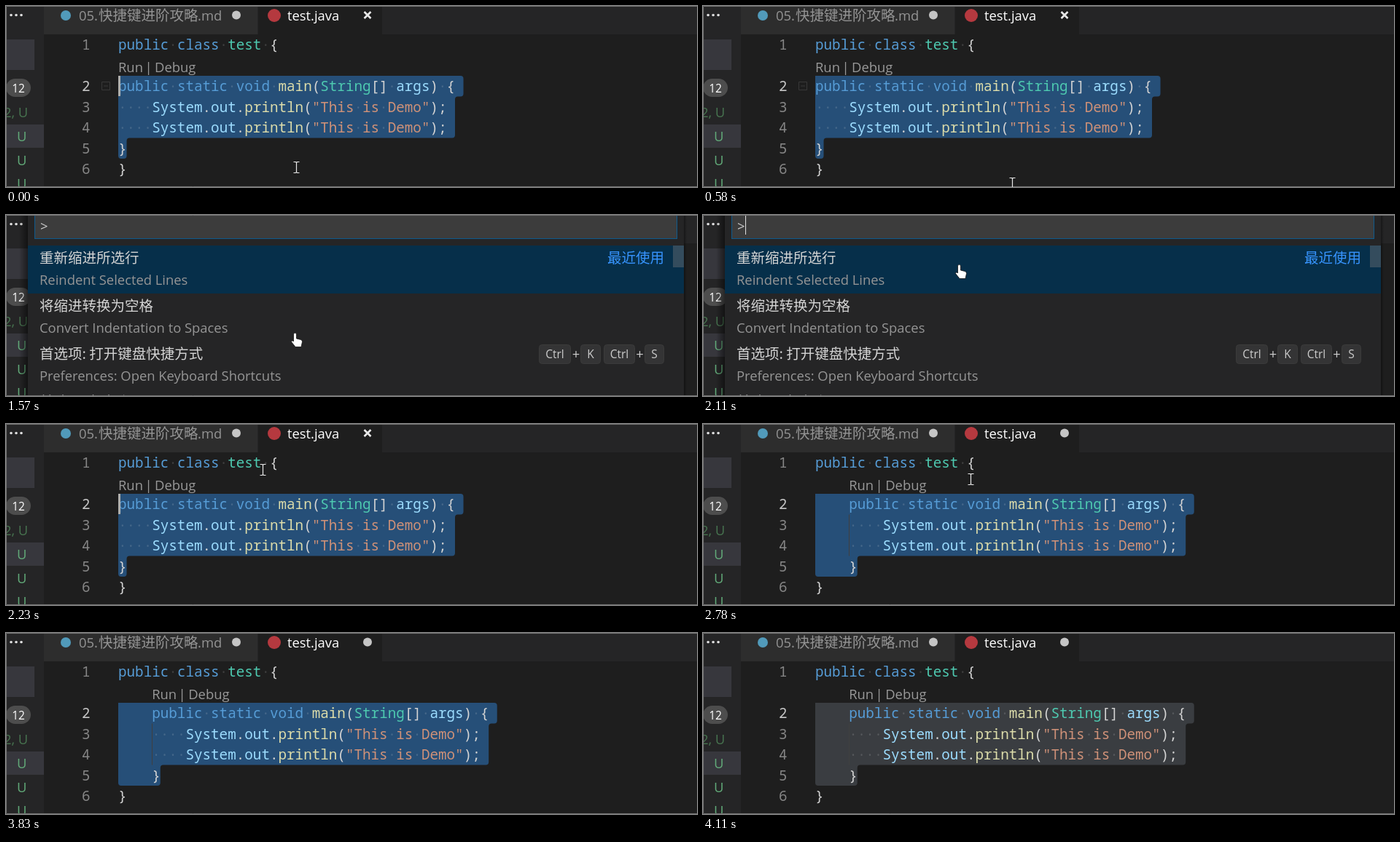
An HTML page that plays this animation: 948x249 px, repeating every 4210 ms.

```html
<!DOCTYPE html>
<html lang="zh">
<head>
<meta charset="utf-8">
<title>Reindent selected lines</title>
<style>
  html, body { margin: 0; width: 100%; height: 100%; overflow: hidden; background: #1e1e1e; }
  svg { display: block; width: 948px; height: 249px; }
  .ui { font: 18.4px "Open Sans", sans-serif; }
  .key { font: 15.5px "Open Sans", sans-serif; }
  .cjk { font: 19.5px "Noto Sans CJK SC", "Noto Sans CJK", sans-serif; }
  .code { font: 19.25px "Noto Sans Mono", monospace; }
</style>
</head>
<body>
<svg id="stage" viewBox="0 0 948 249"></svg>
<script>
const LOOP = 4210, LEFT = 154, CHAR = 11.55, ROW = 28.5;

const rect = (x, y, w, h, fill, more = '') =>
  `<rect x="${x}" y="${y}" width="${w}" height="${h}" fill="${fill}" ${more}/>`;
const text = (cls, x, y, fill, str, more = '') =>
  `<text class="${cls}" x="${x}" y="${y}" fill="${fill}" ${more}>${str}</text>`;
const dot = (x, y, r, fill, more = '') =>
  `<circle cx="${x}" cy="${y}" r="${r}" fill="${fill}" ${more}/>`;
const middle = 'text-anchor="middle"';

// Syntax colouring, with visible whitespace
const words = {};
const paint = (color, list) => list.split(' ').forEach(w => words[w] = color);
paint('#569cd6', 'public class static void');
paint('#4ec9b0', 'test String');
paint('#dcdcaa', 'main println');
paint('#9cdcfe', 'System out args');

const span = (str, color) => str.replace(/ +|[^ ]+/g, s => s[0] === ' '
  ? `<tspan fill="#e3e4e2" fill-opacity=".17">${'·'.repeat(s.length)}</tspan>`
  : `<tspan fill="${color}">${s}</tspan>`);
const highlight = line => line.replace(/"[^"]*"|\w+| +|[^\w" ]+/g, s =>
  span(s, s[0] === '"' ? '#ce9178' : words[s] || '#d4d4d4'));
const baseline = n => n === 1 ? 60 : 117 + (n - 2) * ROW;
const code = (n, line) => text('code', LEFT, baseline(n), '#d4d4d4', highlight(line));

const print = '    System.out.println("This is Demo");';

function selection(indent) {
  const end = n => LEFT + (n + indent) * CHAR;
  const a = end(41), b = end(40), c = end(1);
  return `M154 96H${a - 4}q4 0 4 4V120.5q0 4-4 4H${b + 4}q-4 0-4 4V177.5q0 4-4 4` +
    `H${c + 4}q-4 0-4 4V206q0 4-4 4H158q-4 0-4-4Z`;
}

const sidebar =
  rect(0, 0, 52, 249, '#252526') +
  rect(0, 46, 39, 42, '#37373d') +
  rect(0, 163, 52, 32, '#37373d') +
  [7, 14, 21].map(x => dot(x, 12.5, 1.8, '#e0e0e0')).join('') +
  rect(0, 100, 34, 25, '#4d4d4d', 'rx="12.5"') +
  text('key', 17, 118.5, '#fff', '12', middle) +
  text('ui', -3, 153, '#47734f', '2, U') +
  [186, 219, 251].map(y => text('ui', 15, y, '#62ab79', 'U')).join('');

const tabs =
  rect(52, 0, 896, 39, '#252526') +
  rect(52, 0, 293, 39, '#2d2d2d') +
  rect(346, 0, 170, 39, '#1e1e1e') +
  dot(82, 13, 7, '#519aba') +
  text('ui', 100, 20, '#949494', '05.') +
  text('cjk', 127, 20, '#949494', '快捷键进阶攻略') +
  text('ui', 263, 20, '#949494', '.md') +
  dot(316, 12.5, 6, '#c5c5c5') +
  dot(368, 13, 9, '#b5393f') +
  text('ui', 386, 20, '#fff', 'test.java') +
  '<path id="close" d="M491.5 8l9 9m0-9l-9 9" stroke="#e8e8e8" stroke-width="2.6"/>' +
  dot(496, 12.5, 6, '#c5c5c5', 'id="dirty"');

const editor =
  [1, 2, 3, 4, 5, 6].map(n => text('code', 115.5, baseline(n),
    n === 2 ? '#c6c6c6' : '#858585', n, 'text-anchor="end"')).join('') +
  '<path id="fold" d="M131.500 104.500h11v11h-11zM134 110h6" fill="none" stroke="#383838"/>' +
  '<path id="selection"/>' +
  rect(200, 124.5, 1, 57, '#404040', 'id="guide"') +
  code(1, 'public class test {') +
  '<g id="block">' +
    text('ui', 154, 91, '#999', 'Run') +
    text('ui', 195.5, 91, '#999', '|', middle) +
    text('ui', 204, 91, '#999', 'Debug') +
    code(2, 'public static void main(String[] args) {') +
    code(3, print) + code(4, print) + code(5, '}') +
  '</g>' +
  code(6, '}') +
  rect(154, 96, 3, 28, '#aeafad', 'id="caret"');

const item = (row, title, detail) =>
  text('cjk', 46, 66 + row * 66, '#d4d4d4', title) +
  text('ui', 46, 95.5 + row * 66, '#959595', detail);
const key = (x, w, label) =>
  rect(x + .5, 178.5, w - 1, 26, '#343435', 'rx="4" stroke="#3b3b3b"') +
  text('key', x + w / 2, 197, '#ccc', label, middle);
const plus = x => text('ui', x, 198, '#ccc', '+', middle);

const palette =
  '<g id="palette">' +
    rect(18, 0, 12, 249, 'url(#shadeLeft)') +
    rect(930, 0, 4, 249, 'url(#shadeRight)') +
    rect(30, 0, 900, 249, '#252526') +
    rect(39.5, -5, 881, 37.5, '#3c3c3c', 'stroke="#0e5a8c"') +
    text('ui', 47, 22, '#ccc', '&gt;') +
    rect(58, 1, 1, 26, '#e0e0e0', 'id="inputCaret"') +
    rect(30, 42, 900, 66, '#062f4a') +
    item(0, '重新缩进所选行', 'Reindent Selected Lines') +
    item(1, '将缩进转换为空格', 'Convert Indentation to Spaces') +
    item(2, '首选项: 打开键盘快捷方式', 'Preferences: Open Keyboard Shortcuts') +
    item(3, '首选项: 颜色主题', '') +
    text('cjk', 825, 66, '#3794ff', '最近使用') +
    key(731, 44, 'Ctrl') + plus(782) + key(788, 28, 'K') +
    key(820, 43, 'Ctrl') + plus(869.5) + key(876, 27, 'S') +
    rect(915, 42, 15, 30, '#797979', 'id="scrollbar"') +
  '</g>';

const pointers =
  '<path id="beam" d="M-4-7.500h3l1 1 1-1h3M0-6.500v13M-4 7.500h3l1-1 1 1h3" fill="none" stroke="#e8e8e8" stroke-width="1.2"/>' +
  '<path id="hand" d="M4.500 2.500q2-2.500 4 0v6.500l6 1.500q2 .5 2 3l-1.500 7h-8l-5.500-7q-.5-2 2-1.500l1 1z" fill="#fff" stroke="#111" stroke-width=".8"/>';

const shade = (id, from, to) => `<linearGradient id="${id}">` +
  `<stop stop-opacity="${from}"/><stop offset="1" stop-opacity="${to}"/></linearGradient>`;

const stage = document.getElementById('stage');
stage.innerHTML = `<defs>${shade('shadeLeft', 0, .5)}${shade('shadeRight', .4, 0)}</defs>` +
  rect(0, 0, 948, 249, '#1e1e1e') + sidebar + tabs + editor + palette +
  '<path d="M948 .5H.5V248.500H948" fill="none" stroke="#707070"/>' + pointers;

const el = {};
stage.querySelectorAll('[id]').forEach(e => el[e.id] = e);
const show = (e, on) => e.setAttribute('visibility', on ? 'visible' : 'hidden');
const move = (e, x, y) => e.setAttribute('transform', `translate(${x} ${y})`);

// Pointer samples: time, x, y; a lone time hides it
const track = [
  [0, 398.5, 222], [150, 409.5, 231.5], [300, 415, 235], [430, 418.5, 237],
  [580, 424.5, 244], [730, 430, 256], [880],
  [1570, 390, 161], [1720, 378, 140], [1850, 364, 112], [1970, 350, 78], [2110, 345, 67],
  [2230, 352.5, 63], [2630, 355.5, 66], [2780, 367.5, 76], [2900, 418.5, 108],
  [3050, 485, 165], [3170, 568.5, 216], [3290, 470, 200], [3410, 389.5, 177], [3550]
];

function render(t) {
  const within = (a, b) => t >= a && t < b;
  const indented = t >= 2380, open = within(730, 2230);

  show(el.palette, open);
  show(el.inputCaret, open && !within(1290, 1850));
  el.scrollbar.setAttribute('opacity', t < 880 ? .06 : .4);

  show(el.close, !indented);
  show(el.dirty, indented);
  show(el.guide, indented);
  show(el.fold, t < 730);
  show(el.caret, t < 430 || within(2230, 2780) || within(3290, 3830));
  move(el.block, indented ? 4 * CHAR : 0, 0);
  el.selection.setAttribute('d', selection(indented ? 4 : 0));
  el.selection.setAttribute('fill', t < 4110 ? '#264f78' : '#3a3d41');

  const [, x, y] = track.findLast(p => p[0] <= t);
  const hand = within(880, 2230), visible = x !== undefined;
  show(el.hand, visible && hand);
  show(el.beam, visible && !hand);
  if (visible) move(hand ? el.hand : el.beam, x, y);
}

const start = performance.now();
function tick() {
  render((performance.now() - start) % LOOP);
  requestAnimationFrame(tick);
}
tick();
</script>
</body>
</html>
```
